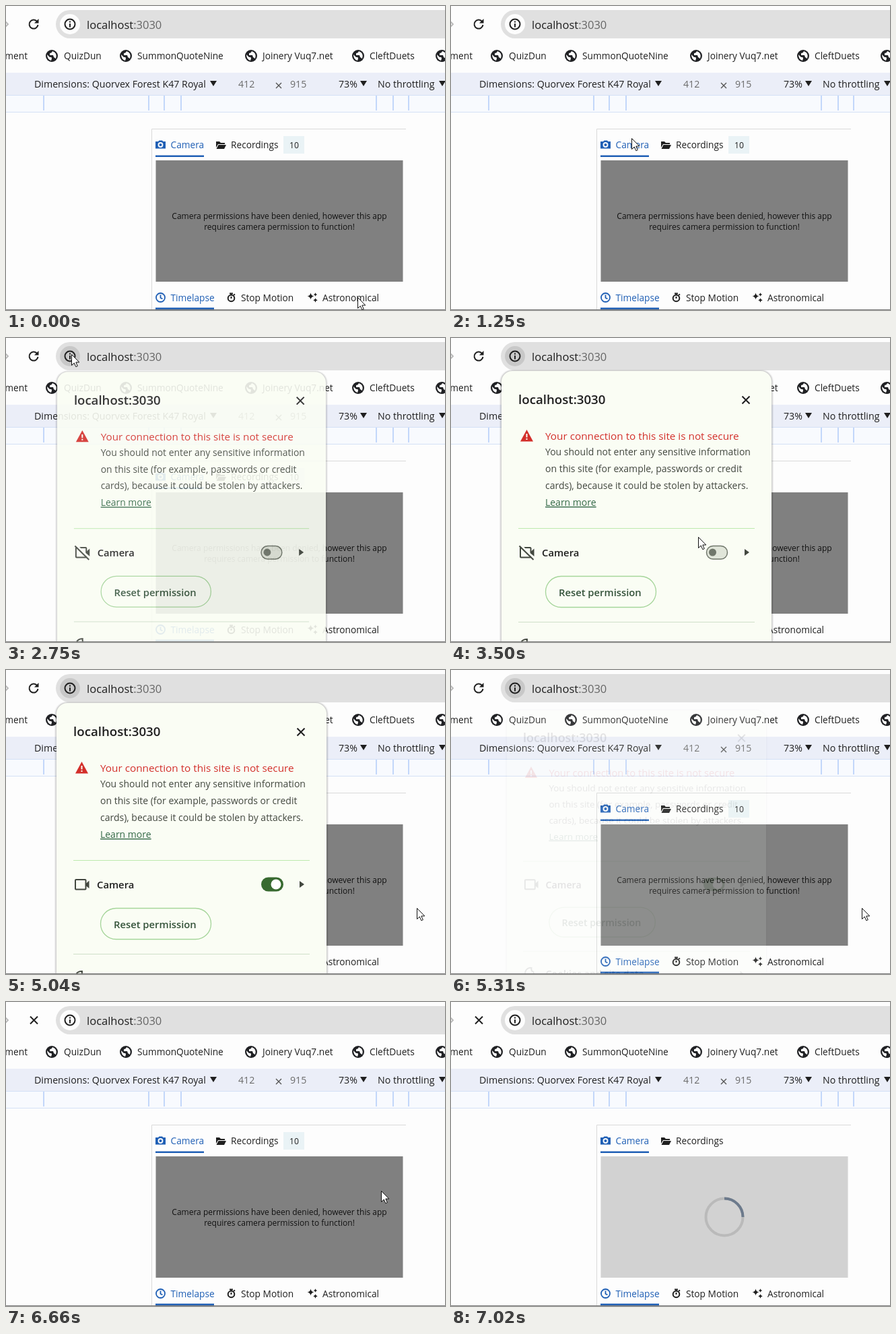
These frames come from a looping animation (652 px wide and 451 px high, 7170 ms). An HTML page:

```html
<!DOCTYPE html>
<html lang="en">
<head>
<meta charset="utf-8">
<title>Granting camera permission</title>
<style>
  html, body { margin: 0; width: 100%; height: 100%; overflow: hidden; background: #fdfdfd; }
  svg { display: block; width: 100vw; height: 100vh; }
  text { font: 13.7px "Open Sans", "Noto Sans", sans-serif; fill: #1f1f1f; white-space: pre; }
  .line { fill: none; stroke: #1f1f1f; stroke-width: 2; }
  .blue { fill: #1f5fb5; }
  .blueLine { fill: none; stroke: #1f5fb5; stroke-width: 1.8; }
  .grey { fill: #6b6b6b; }
  .end { text-anchor: end; }
  .mid { text-anchor: middle; }
  .tool text { font-size: 14.2px; }
  .denied text { font-size: 12px; text-anchor: middle; fill: #111; }
  .body text { font-size: 14px; fill: #42473f; }
  text.bold { font-weight: 600; font-size: 14.8px; }
</style>
</head>
<body>
<svg viewBox="0 0 652 451" preserveAspectRatio="none">
  <defs>
    <g id="globe">
      <circle r="9" fill="#202124"/>
      <path fill="#fdfdfd" d="M-7-2L-3 2Q0 1 0 4L-1 7Q-7 5-7-2ZM1-7Q0-4-3-4V-1H2L3 2L6 4Q9-4 1-7Z"/>
    </g>
    <path id="down" d="M-5-4H5L0 4Z" fill="#1f1f1f"/>
    <path id="star" d="M0-1Q.15-.15 1 0Q.15.15 0 1Q-.15.15-1 0Q-.15-.15 0-1Z" fill="#1f1f1f"/>
    <path id="cross" class="line" d="M-5.5-5.5L5.5 5.5M5.5-5.5L-5.5 5.5"/>
    <path id="next" d="M-3-5L4 0L-3 5Z" fill="#42473f"/>
    <linearGradient id="shadow" x2="0" y2="1">
      <stop stop-opacity=".3"/>
      <stop offset="1" stop-opacity="0"/>
    </linearGradient>
  </defs>
  <rect width="652" height="451" fill="#fdfdfd"/>

  <g id="page">
    <g class="tool">
      <rect y="99" width="652" height="33" fill="#ebeef8"/>
      <text x="42" y="121">Dimensions: Quorvex Forest K47 Royal</text>
      <use href="#down" x="308" y="115"/>
      <text class="grey" x="345" y="121">412</text>
      <path class="line" style="stroke:#555;stroke-width:1.4" d="M401 114L409 122M409 114L401 122"/>
      <text class="grey" x="422" y="121">915</text>
      <text x="494" y="121">73%</text>
      <use href="#down" x="531" y="115"/>
      <text x="552" y="121">No throttling</text>
      <use href="#down" x="648" y="115"/>
    </g>
    <rect y="132" width="652" height="25" fill="#f8fafe"/>
    <path d="M0 132.500H652M0 157.500H652" stroke="#d5e1f6"/>
    <path id="breakpoints" stroke="#c3d7fa" stroke-width="2"/>

    <path d="M594 182.500H216.500V451" fill="none" stroke="#d9d9d9"/>
    <path class="blue" d="M222 201H226L227.500 199.500H232L233.500 201H237V211.500H222Z"/>
    <circle cx="229.500" cy="206" r="3" fill="none" stroke="#fdfdfd" stroke-width="1.8"/>
    <text class="blue" x="244.500" y="211">Camera</text>
    <rect class="blue" x="222" y="221.500" width="72" height="2.500"/>
    <path fill="#1f1f1f" d="M312 201H317L319 203H325V205H315L312 210ZM315.500 206H327L324 212H312.500Z"/>
    <text x="334" y="211">Recordings</text>
    <g id="badge">
      <rect x="412" y="193" width="31" height="26" fill="#eaf3f6"/>
      <text class="mid" x="428" y="211" style="font-size:12.2px">10</text>
    </g>
    <g id="denied" class="denied">
      <rect x="222.500" y="229" width="367" height="180" fill="#808080"/>
      <text x="406" y="316">Camera permissions have been denied, however this app</text>
      <text x="406" y="332">requires camera permission to function!</text>
    </g>
    <g id="loading" fill="none" stroke-width="4">
      <rect x="222.500" y="229" width="367" height="180" fill="#d2d2d2"/>
      <circle cx="406" cy="319" r="27.500" stroke="#bababa"/>
      <path id="arc" d="M406 291.500A27.500 27.500 0 0 1 433.500 319" stroke="#6c7a8c"/>
    </g>
    <circle class="blueLine" cx="229.500" cy="432.500" r="6.500"/>
    <path class="blueLine" d="M229.500 428.500V433L232.500 434.500"/>
    <text class="blue" x="244.500" y="438">Timelapse</text>
    <rect class="blue" x="222" y="447.500" width="87" height="2.500"/>
    <circle class="line" cx="334.500" cy="433.500" r="4.800"/>
    <path class="line" d="M332 426.500H337M334.500 427V429M338 429L340 427.500M334.500 431V434"/>
    <text x="349" y="438">Stop Motion</text>
    <use href="#star" transform="translate(452.500 430.500) scale(5)"/>
    <use href="#star" transform="translate(459.500 428) scale(2.800)"/>
    <use href="#star" transform="translate(459.500 436.500) scale(3.200)"/>
    <text x="470" y="438">Astronomical</text>
  </g>

  <g id="infobar">
    <rect y="93" width="652" height="71" fill="#fefefe"/>
    <rect y="164" width="652" height="5" fill="url(#shadow)"/>
    <text class="end" x="416" y="138" style="font-size:15.600px">Reload this page to apply your updated settings on this site</text>
    <rect id="reloadButton" x="437" y="108" width="91" height="47" rx="23.500"/>
    <text class="bold mid" x="482" y="138" style="fill:#fff">Reload</text>
  </g>

  <rect width="652" height="99" fill="#fdfdfd"/>
  <path class="line" style="stroke:#bbb" d="M-4 20L3 27L-4 34"/>
  <g id="reloadIcon">
    <path class="line" d="M46.500 23.500A6.500 6.500 0 1 0 47.500 28"/>
    <path fill="#1f1f1f" d="M48.500 19V25.500H42Z"/>
  </g>
  <use id="stopIcon" href="#cross" x="41.500" y="27"/>
  <rect x="74" y="6" width="620" height="42" rx="21" fill="#e0e0e0"/>
  <circle id="infoDisc" cx="95" cy="27" r="15"/>
  <circle class="line" cx="95" cy="27" r="7.500"/>
  <path class="line" d="M95 22.500V24.500M95 26V31.500"/>
  <text x="120" y="34" style="font-size:16.500px">localhost<tspan fill="#666">:3030</tspan></text>
  <g>
    <text class="end" x="32" y="79">ment</text>
    <use href="#globe" x="68" y="74"/><text x="86" y="79">QuizDun</text>
    <use href="#globe" x="178" y="74"/><text x="195" y="79">SummonQuoteNine</text>
    <use href="#globe" x="364" y="74"/><text x="381" y="79">Joinery Vuq7.net</text>
    <use href="#globe" x="523" y="74"/><text x="540" y="79">CleftDuets</text>
    <use href="#globe" x="647" y="74"/>
  </g>

  <g id="popup">
    <rect x="72" y="47" width="407" height="545" rx="18" fill="#000" opacity=".06"/>
    <rect x="73.500" y="48" width="404" height="542" rx="17" fill="#000" opacity=".12"/>
    <rect x="75" y="49" width="401" height="540" rx="16" fill="#fafdf4"/>
    <text class="bold" x="100" y="98" style="font-size:18.700px">localhost:3030</text>
    <use href="#cross" x="438" y="92"/>
    <path fill="#d32f2a" d="M112.500 136L122 153.500H103Z"/>
    <path d="M112.500 142V147.500M112.500 149V151" stroke="#fafdf4" stroke-width="2"/>
    <text x="140" y="151" style="font-size:15.300px;fill:#d32f2a">Your connection to this site is not secure</text>
    <g class="body">
      <text x="140" y="174">You should not enter any sensitive information</text>
      <text x="140" y="199">on this site (for example, passwords or credit</text>
      <text x="140" y="224">cards), because it could be stolen by attackers.</text>
      <text x="140" y="249" style="fill:#336847;text-decoration:underline">Learn more</text>
    </g>
    <path d="M100 282.500H451" stroke="#bdeaae"/>
    <path d="M100 421.500H451" stroke="#cfe0c8"/>
    <rect class="line" style="stroke:#42473f" x="103" y="311" width="15.500" height="14.500" rx="1"/>
    <path fill="#42473f" d="M118 317.500L123.500 312.500V324L118 319.500Z"/>
    <g id="slash">
      <path d="M103 307L125 328" stroke="#fafdf4" stroke-width="3"/>
      <path d="M101.500 308.500L122.500 329" stroke="#42473f" stroke-width="2"/>
    </g>
    <text class="bold" x="135" y="324">Camera</text>
    <circle id="ripple" cx="387.500" cy="316.500" r="12.500" fill="#42473f" opacity=".14"/>
    <g id="toggleOff">
      <rect x="379.500" y="308.500" width="31" height="19.500" rx="9.700" fill="#e0e5d9" stroke="#70776b" stroke-width="1.500"/>
      <circle cx="388.500" cy="318" r="5.500" fill="#70776b"/>
    </g>
    <g id="toggleOn">
      <rect x="379" y="307.500" width="33" height="21" rx="10.500" fill="#386a30"/>
      <circle cx="401" cy="318" r="7.500" fill="#fff"/>
    </g>
    <use href="#next" x="439" y="318"/>
    <rect x="140.500" y="353.500" width="164" height="46" rx="23" fill="none" stroke="#a5d59a" stroke-width="1.300"/>
    <text class="bold" x="160" y="383" style="fill:#34523a">Reset permission</text>
    <path class="line" d="M113 447A8.500 8.500 0 1 0 120 457Q116 457 116 453Q112 452 113 447Z" style="stroke:#42473f"/>
    <text class="bold" x="135" y="462">Cookies and site data</text>
    <use href="#next" x="439" y="457"/>
  </g>

  <rect y="450" width="652" height="1" fill="#7d7d7d"/>
  <path id="cursor" d="M.5.500V16.500L4.300 13L6.800 18.700L9.300 17.600L6.800 12H11.800Z" fill="#fff" stroke="#111"/>
</svg>

<script>
const LOOP = 7170, STEP = 120;
const INFOBAR_HEIGHT = 65;
const HOVER_INFO = 2060, OPEN_POPUP = 2630, PRESS_TOGGLE = 4260, ALLOW = 4410, CLOSE_POPUP = 5190,
  OPEN_INFOBAR = 5460, RESET_INFO = 5850, HOVER_RELOAD = 5970, RELOAD = 6390, LOADING = 6780;

// One entry per hand movement, each starting where the last one ended.
const cursorStart = { x: 522, y: 432 };
const glides = [
  { start: 440, steps: 3, x: 476, y: 403 },
  { start: 1010, steps: 5, x: 228, y: 156 },
  { start: 1640, steps: 7, x: 97, y: 24 },
  { start: 3140, steps: 5, x: 378, y: 306 },
  { start: 3770, steps: 2, x: 393, y: 311 },
  { start: 4650, steps: 4, x: 610, y: 353 },
  { start: OPEN_INFOBAR, steps: 6, x: 462, y: 124 },
  { start: 6660, steps: 4, x: 680, y: 480 },
];

function progress(t, start, steps) {
  const done = Math.floor((t - start) / STEP) + 1;
  const k = Math.min(Math.max(done / steps, 0), 1);
  return 1 - (1 - k) ** 2;
}

function cursorAt(t) {
  return glides.reduce((from, { start, steps, x, y }) => {
    const k = progress(t, start, steps);
    return { x: from.x + (x - from.x) * k, y: from.y + (y - from.y) * k };
  }, cursorStart);
}

const el = id => document.getElementById(id);
const set = (id, name, value) => el(id).setAttribute(name, value);
const show = (id, visible) => set(id, 'display', visible ? 'inline' : 'none');

function draw(t) {
  const { x, y } = cursorAt(t);
  set('cursor', 'transform', `translate(${Math.round(x)} ${Math.round(y)})`);

  const opacity = progress(t, OPEN_POPUP, 3) - progress(t, CLOSE_POPUP, 3);
  const scale = .955 + .045 * opacity;
  set('popup', 'opacity', opacity);
  set('popup', 'transform', `translate(275 318) scale(${scale}) translate(-275 -318)`);
  const infoIdle = t < HOVER_INFO || t >= RESET_INFO;
  set('infoDisc', 'fill', infoIdle ? '#fdfdfd' : t < OPEN_POPUP ? '#d6d6d6' : '#c8c8c8');

  const allowed = t >= ALLOW;
  show('slash', !allowed);
  show('toggleOff', !allowed);
  show('toggleOn', allowed);
  show('ripple', t >= PRESS_TOGGLE && !allowed);

  const height = INFOBAR_HEIGHT * (progress(t, OPEN_INFOBAR, 3) - progress(t, RELOAD, 2));
  set('page', 'transform', `translate(0 ${height})`);
  set('infobar', 'transform', `translate(0 ${height - INFOBAR_HEIGHT})`);
  show('infobar', height > 0);
  set('reloadButton', 'fill', t >= HOVER_RELOAD ? '#4b7645' : '#386a30');

  show('reloadIcon', t < RELOAD);
  show('stopIcon', t >= RELOAD);
  show('badge', t < LOADING);
  show('denied', t < LOADING);
  show('loading', t >= LOADING);
  const turn = Math.floor((t - LOADING) / STEP) - 2;
  set('arc', 'transform', `rotate(${turn * STEP * .36} 406 319)`);
}

// Ruler marks lie symmetrically around the middle of the device.
set('breakpoints', 'd', [145, 170, 193, 349].map(d => `M${405 - d} 133V155M${405 + d} 133V155`).join(''));

function frame() {
  draw(performance.now() % LOOP);
  requestAnimationFrame(frame);
}
frame();
</script>
</body>
</html>
```
